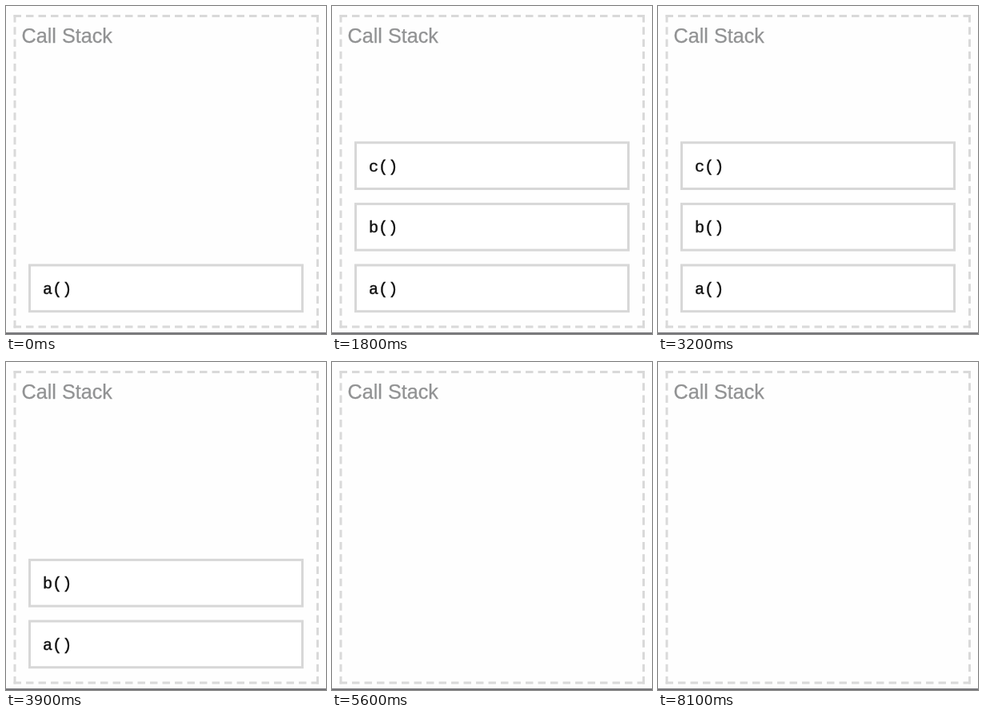
An HTML page for the animation above (8200 ms loop, 400 by 410 pixels).

```html
<!DOCTYPE html>
<html lang="en">
<head>
<meta charset="utf-8">
<title>Call Stack</title>
<style>
  html, body { margin: 0; width: 100%; height: 100%; overflow: hidden; background: #fefefe; }
  svg { display: block; width: 400px; height: 410px; }
  .edge { stroke: #d9d9d9; stroke-width: 3; fill: none; }
  .title { font: 25.2px "Liberation Sans", Arial, sans-serif; fill: #919293; stroke: #919293; stroke-width: .25; }
  .call rect { fill: #fff; stroke: #d7d7d7; stroke-width: 3; }
  .call text { font: 20.2px "Liberation Mono", "Courier New", monospace; fill: #111; stroke: #111; stroke-width: .4; }
</style>
</head>
<body>
<svg viewBox="0 0 400 410">
  <g class="edge">
    <path d="M9.5 12.5H391M9.5 401H391" stroke-dasharray="9.5 6"/>
    <path d="M11 11V402.5M389.5 11V402.5" stroke-dasharray="9.5 5.78"/>
  </g>
  <rect y="408" width="400" height="2" fill="#77777a"/>
  <text class="title" x="19.5" y="46">Call Stack</text>
  <g id="stack"></g>
</svg>
<script>
const LOOP = 8200;
const ROW = 76.6;

// label, time pushed, time popped (ms)
const calls = [
  ['a()', 0, 5200],
  ['b()', 700, 4500],
  ['c()', 1500, 3700],
  ['console.log("hello")', 2200, 3000]
];

const stack = document.getElementById('stack');

function add(parent, tag, attrs) {
  const el = document.createElementNS('http://www.w3.org/2000/svg', tag);
  for (const key in attrs) el.setAttribute(key, attrs[key]);
  return parent.appendChild(el);
}

const rows = calls.map(([label, from, to], i) => {
  const el = add(stack, 'g', { class: 'call', transform: `translate(0 ${-ROW * i})` });
  add(el, 'rect', { x: 29.5, y: 324, width: 341, height: 57.7 });
  add(el, 'text', { x: 46, y: 360 }).textContent = label;
  return { el, from, to };
});

const start = performance.now();

function draw(now) {
  const t = Math.max(0, now - start) % LOOP;
  for (const { el, from, to } of rows) {
    el.setAttribute('visibility', t >= from && t < to ? 'visible' : 'hidden');
  }
  requestAnimationFrame(draw);
}
draw(start);
</script>
</body>
</html>
```
